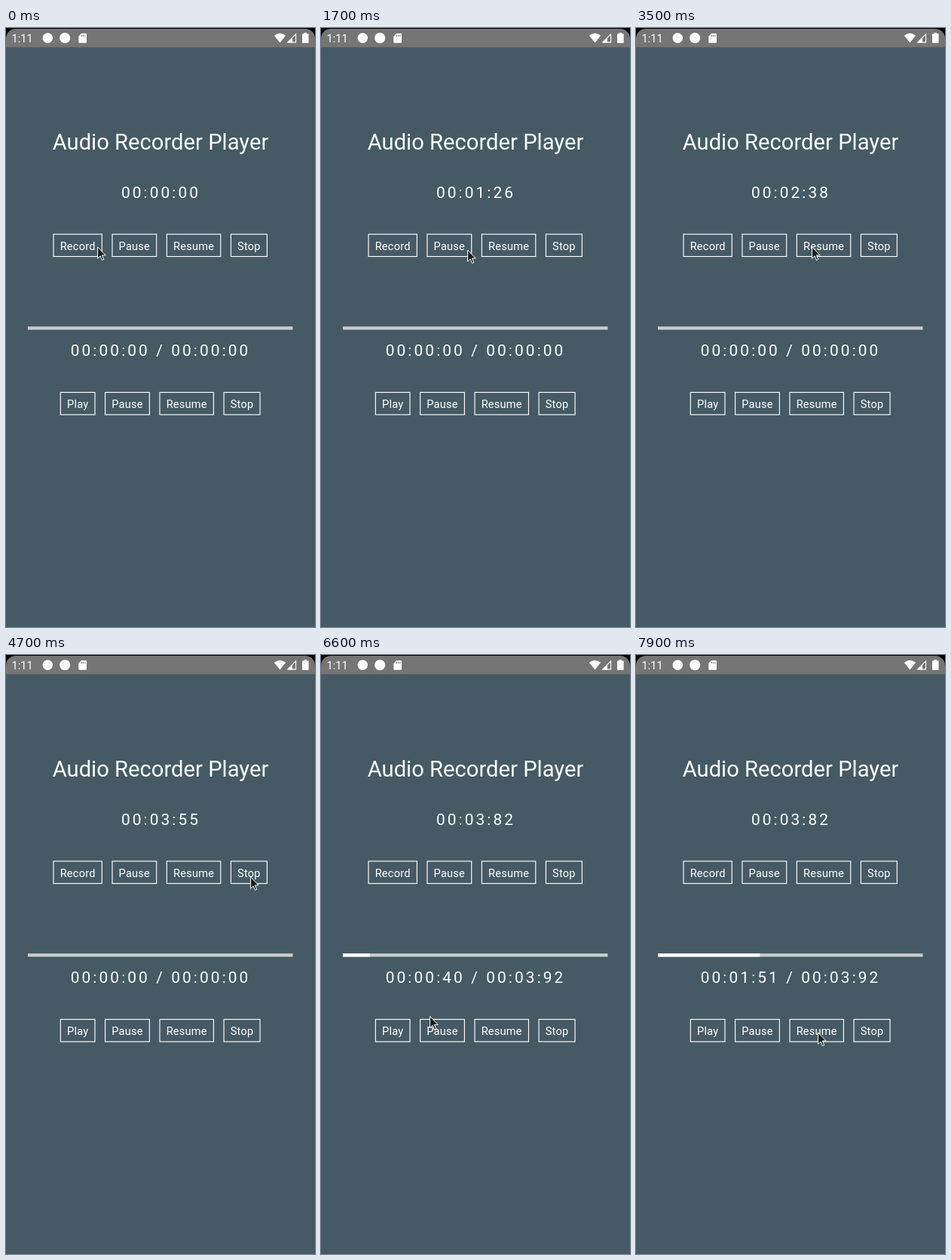
Animation of 410x793 px, one loop 8 s. Source, as an HTML page:

```html
<!DOCTYPE html>
<html lang="en">
<head>
<meta charset="utf-8">
<title>Audio Recorder Player</title>
<style>
  html, body { margin: 0; width: 100%; height: 100%; overflow: hidden; background: #455a64; }
  svg { display: block; width: 100%; height: 100%; }
  text { font-family: Roboto, sans-serif; fill: #fff; white-space: pre; }
  .counter { font-size: 20.87px; letter-spacing: 3.1px; }
  .button text { font-size: 14.6px; letter-spacing: .22px; }
  .button rect { fill: none; stroke: #fff; stroke-width: 1.14px; }
</style>
</head>
<body>
<svg viewBox="0 0 410 793">
  <rect width="410" height="26"/>
  <rect y="1" width="410" height="40" rx="13" fill="#757575"/>
  <rect y="25.5" width="410" height="767.5" fill="#455a64"/>

  <g fill="#fff">
    <text x="7.5" y="18.7" font-size="14.6">1:11</text>
    <circle cx="55.3" cy="13.3" r="6.7"/>
    <circle cx="78.2" cy="13.3" r="7"/>
    <path d="M100 7.2H106Q107 7.2 107 8.2V18.8Q107 19.8 106 19.8H97.3Q96.3 19.8 96.3 18.8V11Z"/>
    <path d="M100.3 9V11.6M102.6 9V11.6M104.9 9V11.6" stroke="#757575"/>
    <path d="M363.5 19.5L355.8 10Q363.5 3.8 371.2 10Z"/>
    <path d="M373.8 18.9H384.6V8.1Z" fill="none" stroke="#fff" stroke-width="1.1"/>
    <path d="M373.4 19.4L380 12.7V19.4Z"/>
    <path d="M395.6 6.2H399V7.6H400.6Q401.6 7.6 401.6 8.6V19Q401.6 20 400.6 20H394Q393 20 393 19V8.6Q393 7.6 394 7.6H395.6Z"/>
  </g>

  <text x="205" y="161" font-size="29.2" text-anchor="middle">Audio Recorder Player</text>
  <text id="recorded" class="counter" x="152.9" y="224.9"></text>
  <rect x="29" y="395.2" width="351.5" height="4.3" fill="#ccc"/>
  <rect id="bar" x="29" y="395.2" height="4.3" fill="#fff"/>
  <text id="played" class="counter" x="85.7" y="434.1"></text>
  <g id="buttons"></g>
  <path id="cursor" d="M.6 1.4V16.6L4.1 13.3L6.5 18.9L8.8 17.9L6.4 12.4H11.2Z" fill="#1c1c1c" stroke="#fff"/>
</svg>
<script>
const LOOP = 8000, STEP = 100, TOTAL = 3920;
const $ = id => document.getElementById(id);

// label and the span of time it is pressed
const recordRow = [['Record', 400, 700], ['Pause', 2200, 2600], ['Resume', 2900, 3100], ['Stop', 4800, 5200]];
const playRow = [['Play', 6000, 6300], ['Pause', 7600, 7800], ['Resume'], ['Stop']];

// time, milliseconds on the counter
const recording = [[440, 0], [2400, 1960], [3080, 1960], [3500, 2380], [3600, 2380], [4950, 3820]];
const playing = [[6200, 0], [6600, 400], [7760, 1510]];

// pointer tip x, y, time of arrival, time of leaving
const pointer = [
  [121, 288.5, 0, 600], [225, 196, 900], [240, 315, 1200], [194, 292.5, 1700, 2500],
  [233, 288.5, 2600, 3600], [198, 297, 3900], [314, 296, 4500], [324, 292.5, 4600, 5100],
  [300, 259, 5300], [140, 509, 5600], [127, 496.5, 5800], [108, 500, 6000, 6200],
  [135, 354, 6400], [144, 477, 6600], [170, 541, 7300], [172, 503, 7500, 7700], [241, 498.5, 7900]
].flatMap(([x, y, arrive, leave = arrive]) => [[arrive, x, y], [leave, x, y]]);

// Lays out a centred row, each button as wide as its label
function addRow(row, top) {
  const pad = 9.2, gap = 12.5;
  const items = row.map(([label, from, until]) => {
    $('buttons').insertAdjacentHTML('beforeend',
      `<g class="button"><rect y="${top}" height="29.5"/><text y="${top + 20.9}">${label}</text></g>`);
    const node = $('buttons').lastElementChild, [box, text] = node.children;
    return { node, box, text, from, until, width: text.getComputedTextLength() + 2 * pad };
  });
  let x = 204.7 - (items.reduce((sum, b) => sum + b.width + gap, 0) - gap) / 2;
  for (const { box, text, width } of items) {
    box.setAttribute('x', x + .57);
    box.setAttribute('width', width - 1.14);
    text.setAttribute('x', x + pad);
    x += width + gap;
  }
  return items;
}
const buttons = [...addRow(recordRow, 273), ...addRow(playRow, 482.4)];

function at(keys, t) {
  const i = keys.findIndex(k => k[0] >= t);
  if (i < 1) return keys.at(i).slice(1);
  const a = keys[i - 1], b = keys[i], p = (t - a[0]) / (b[0] - a[0]);
  return a.slice(1).map((v, j) => v + (b[j + 1] - v) * p);
}

function clock(ms) {
  const two = n => String(Math.floor(n)).padStart(2, '0');
  return `00:${two(ms / 1000)}:${two(ms % 1000 / 10 + .01)}`;
}

function draw(now) {
  const t = Math.floor(now % LOOP / STEP) * STEP;
  const [pos] = at(playing, t);
  $('recorded').textContent = clock(at(recording, t)[0]);
  $('played').textContent = `${clock(pos)} / ${clock(t < 6300 ? 0 : TOTAL)}`;
  $('bar').setAttribute('width', 351.5 * pos / TOTAL);
  for (const { node, from, until } of buttons)
    node.setAttribute('opacity', t >= from && t < until ? .2 : 1);
  $('cursor').setAttribute('transform', `translate(${at(pointer, t)})`);
}

const start = performance.now();
function tick() {
  draw(performance.now() - start);
  requestAnimationFrame(tick);
}
tick();
</script>
</body>
</html>
```
